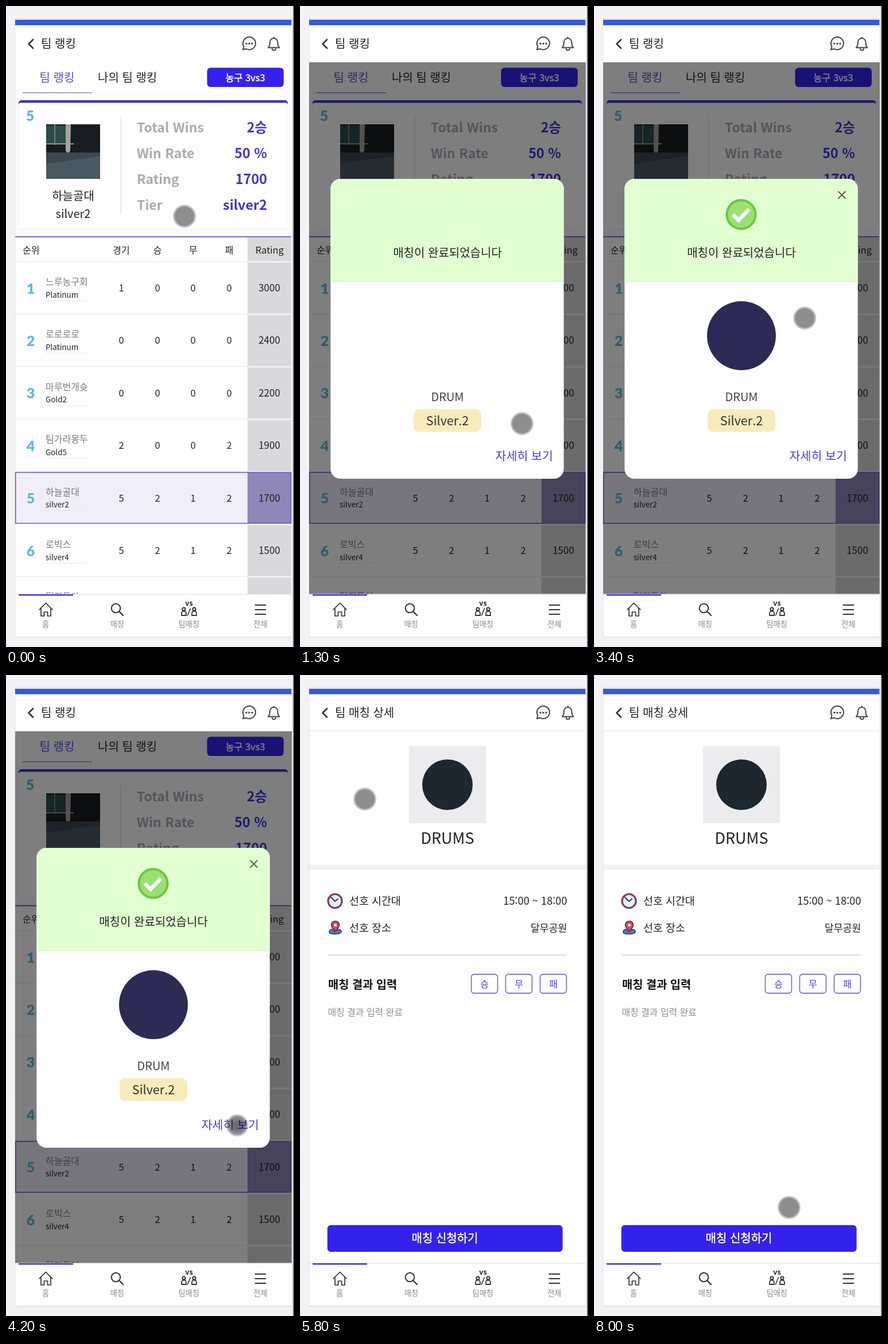
Recreate the animation shown at these times as an HTML page. Size 502x1116 px, loop 8100 ms.

```html
<!DOCTYPE html>
<html lang="ko">
<head>
<meta charset="utf-8">
<title>팀 랭킹</title>
<style>
  html, body { margin: 0; width: 100%; height: 100%; overflow: hidden; background: #f3f2f5; }
  svg { display: block; width: 502px; height: 1116px; }
  text { font-family: "Noto Sans CJK KR", "Noto Sans KR", "Noto Sans", sans-serif; white-space: pre; }
  .rank { font-family: Lato, sans-serif; }
  .medium { stroke: #fff; stroke-width: .5; }
  .icon { fill: none; stroke: #333; stroke-width: 2; stroke-linecap: round; stroke-linejoin: round; }
</style>
</head>
<body>
<svg id="stage" viewBox="0 0 502 1116"></svg>
<script>
const LOOP = 8100, STEP = 100;
const VIOLET = '#4434d2', BUTTON = '#3422ec', GREY = '#d9d8da';

const rect = (x, y, w, h, fill, more = '') =>
  `<rect x="${x}" y="${y}" width="${w}" height="${h}" fill="${fill}" ${more}/>`;
const circle = (x, y, r, fill, more = '') =>
  `<circle cx="${x}" cy="${y}" r="${r}" fill="${fill}" ${more}/>`;
const path = (d, more = 'class="icon"') => `<path d="${d}" ${more}/>`;
const text = (x, y, s, size, fill = '#222', anchor = 'start', weight = 400, more = '') =>
  `<text x="${x}" y="${y}" font-size="${size}" fill="${fill}" text-anchor="${anchor}" font-weight="${weight}" ${more}>${s}</text>`;
const mid = (x, y, s, size, fill, weight, more) => text(x, y, s, size, fill, 'middle', weight, more);
const end = (x, y, s, size, fill, weight) => text(x, y, s, size, fill, 'end', weight);
const rank = (x, y, n) => mid(x, y, n, 25, '#62b9d9', 900, 'class="rank"');
const label = (x, y, s, size) => mid(x, y, s, size, '#fff', 400, 'class="medium"');
const group = (id, ...parts) => `<g id="${id}">${parts.join('')}</g>`;
const glow = (id, ...stops) => `<radialGradient id="${id}">` +
  stops.map(([at, alpha]) => `<stop offset="${at}" stop-opacity="${alpha}"/>`).join('') + '</radialGradient>';

const columns = [201, 264, 326, 389];
const teams = [
  ['느루농구회', 'Platinum', '1000', 3000],
  ['로로로로', 'Platinum', '0000', 2400],
  ['마루번개슛', 'Gold2', '0000', 2200],
  ['팀가라몽두', 'Gold5', '2002', 1900],
  ['하늘골대', 'silver2', '5212', 1700],
  ['로빅스', 'silver4', '5212', 1500],
  ['팀진두아', '', '', ''],
];

function teamRow([name, tier, scores, rating], i) {
  const y = 491 + i * 91.4, top = y - 45.5, mine = i === 4;
  return [
    mine ? rect(16.7, top + 1, 480, 88.5, '#f0eefb') : '',
    rect(421, top + 1, 76, 89, mine ? '#8f87b7' : GREY),
    mine ? rect(16.7, top + 1, 480, 88.5, 'none', 'stroke="#6458c6" stroke-width="1.5"')
         : rect(16, top + 90, 482, 1.6, '#efeff1'),
    rank(43, y + 9.5, i + 1),
    text(69, y - 5, name, 16, '#7b7b7f'),
    text(69, y + 16.5, tier, 13.4),
    rect(69, y + 21.5, 73, 1, '#e9e8ed'),
    ...[...scores].map((n, k) => mid(columns[k], y + 6, n, 16.5)),
    mid(459, y + 6, rating, 17),
  ].join('');
}

const photo = [
  rect(70, 206, 94, 95, '#4b5862'),
  rect(70, 206, 94, 49, '#191d21'),
  rect(70, 208, 34, 33, '#2c4b4a'),
  rect(70, 239, 48, 2, '#8c9a98'),
  rect(84, 206, 2, 36, '#71817e'),
  path('M104 206h9l-1 46-4 6-4-6z', 'fill="#a6a4a0"'),
  path('M70 255h94v6l-94 14z', 'fill="#3b4751"'),
].join('');

const stats = [['Total Wins', '2승'], ['Win Rate', '50 %'], ['Rating', '1700'], ['Tier', 'silver2']];

const ranking = group('ranking',
  rect(16, 98, 482, 926, '#fbfafd'),
  rect(16, 98, 482, 54, '#fefdff'),
  mid(89, 132, '팀 랭킹', 20, '#5a49dc'),
  text(160, 132, '나의 팀 랭킹', 20),
  rect(29, 150, 121, 2, '#a9a0e4'),
  rect(350.5, 107.5, 133.5, 33.5, BUTTON, 'rx="6"'),
  label(417, 131, '농구 3vs3', 16.4),
  rect(21, 164, 471, 225, '#f1f0f4', 'rx="6"'),
  rect(22, 164, 469, 30, '#3f30cc', 'rx="5"'),
  rect(22, 168.5, 469, 219, '#fefdff', 'rx="4"'),
  rank(42, 200, 5),
  photo,
  mid(117, 338, '하늘골대', 20),
  mid(117, 369, 'silver2', 20),
  rect(199.5, 193, 1.3, 170, '#dedde2'),
  ...stats.map(([name, value], i) =>
    text(228, 219.5 + i * 45, name, 23, '#ababb0', 'start', 700) +
    end(455, 219.5 + i * 45, value, 23.4, VIOLET, 700)),
  rect(16, 402, 482, 622, '#fefdff'),
  rect(421, 403, 76, 41, GREY),
  rect(16, 444, 482, 1.6, '#efeff1'),
  rect(16, 400.8, 481, 1.9, '#6a5dc9'),
  text(29, 430.5, '순위', 16),
  ...['경기', '승', '무', '패'].map((s, k) => mid(columns[k], 430.5, s, 16)),
  mid(459.5, 430.5, 'Rating', 16.4),
  ...teams.map(teamRow));

const modal = group('modal',
  rect(16, 98, 482, 926, '#000', 'opacity=".5"'),
  rect(53.3, 301, 406.5, 522, '#fefdff', 'rx="17"'),
  path('M53.3 480V318a17 17 0 0 1 17-17H442.8a17 17 0 0 1 17 17V480z', 'fill="#e2ffd2"'),
  rect(53.3, 479.5, 406.5, 1, '#dfe9da'),
  mid(257, 436.5, '매칭이 완료되었습니다', 20),
  mid(257, 688, 'DRUM', 20, '#444'),
  rect(198, 702, 118, 39.5, '#f8ebbb', 'rx="10"'),
  mid(257, 729.5, 'Silver.2', 21.6, '#333'),
  end(441, 791, '자세히 보기', 20.6, '#4c3be4'),
  group('images',
    path('M426 323l12 12m0-12l-12 12', 'class="icon" style="stroke-width:1.6"'),
    circle(256.5, 363, 25, '#9cdf72', 'stroke="#68c93f" stroke-width="4"'),
    path('M242 363l10 10 18-19', 'fill="none" stroke="#fff" stroke-width="6.5"'),
    circle(257, 574, 60, '#2d2b55')));

const clock = circle(61, 393.5, 12, '#e9eff8', 'stroke="#33335a" stroke-width="3"') +
  circle(61, 393.5, 11.5, 'none', 'stroke="#b5465a" stroke-width="1.6"') +
  path('M54 387l7 7 5-4', 'class="icon" style="stroke:#33335a"');
const pin = path('M51 447q0-4 5-4h11q5 0 5 4t-11 4-10-4z', 'fill="#5478b4" stroke="#33335a" stroke-width="1.5"') +
  path('M61.5 447q-7-8-7-12a7 6.5 0 0 1 14 0q0 4-7 12z', 'fill="#d8475c" stroke="#4a2c4c" stroke-width="1.5"') +
  circle(61.5, 435.5, 2.5, '#fff');

const detail = group('detail',
  rect(16, 98, 482, 926, '#fefdff'),
  rect(16, 96.5, 482, 1.8, '#efeef1'),
  rect(190, 124, 134, 134, '#ececee'),
  circle(257, 191, 44, '#1c272f'),
  mid(257, 294, 'DRUMS', 27),
  rect(16, 330, 482, 9, '#f2f1f4'),
  clock, pin,
  text(86, 400, '선호 시간대', 18.4),
  end(465.5, 400, '15:00 ~ 18:00', 18.2),
  text(86, 447, '선호 장소', 18.4),
  end(465.5, 447, '달무공원', 17.3),
  rect(48, 486.5, 417, 2, '#dad9df'),
  text(49, 546, '매칭 결과 입력', 19.8, '#111', 'start', 700),
  text(48.5, 593, '매칭 결과 입력 완료', 15.9, '#8f8f94'),
  ...['승', '무', '패'].map((s, i) =>
    rect(298.5 + i * 60, 521, 46, 33, '#fefdff', 'rx="5" stroke="#5b4ed6" stroke-width="1.3"') +
    mid(321.5 + i * 60, 543.5, s, 16, '#4f40dc')),
  rect(47.7, 957.7, 410, 46.5, BUTTON, 'rx="6"'),
  label(252.5, 988, '매칭 신청하기', 20));

const header = group('header',
  rect(16, 24, 481.5, 9.5, '#345ad6'),
  path('M47 58.5l-7.5 7.5 7.5 7.5', 'class="icon" style="stroke-width:2.6"'),
  text(61, 73, '', 20, '#222', 'start', 400, 'id="title"'),
  path('M413 76l1.5-5.5a11 11 0 1 1 4 4z', 'class="icon" style="stroke:#444"'),
  ...[419, 424, 429].map(x => circle(x, 65.5, 1.6, '#333')),
  path('M457 72.5q3-3 3-9a6.8 7.5 0 0 1 13.6 0q0 6 3 9zM464 74.5a3 2.5 0 0 0 6 0M466.8 54.5v1', 'class="icon" style="stroke:#444"'));

const person = x => circle(x, 1050, 2.6, 'none', 'stroke="#222" stroke-width="1.8"') +
  path(`M${x - 4} 1061v-3.5a4 4 0 0 1 8 0v3.5z`, 'class="icon" style="stroke-width:1.8"');

const nav = group('nav',
  rect(16, 1024, 482, 74, '#fefdff'),
  rect(16, 1023.5, 482, 1.5, '#e8e7ec'),
  rect(22, 1024, 95, 2.8, '#5546d8'),
  path('M58 1051l11.5-11.5 11.5 11.5M61 1049v13h5.5v-7h6v7h5.5v-13', 'class="icon" style="stroke-width:1.7"'),
  circle(191.5, 1048.5, 7.8, 'none', 'class="icon"'),
  path('M197.5 1054.5l6.5 6.5', 'class="icon" style="stroke-width:2.4"'),
  mid(319, 1044, 'vs', 12.5, '#222', 700),
  person(310), person(328),
  path('M316.5 1061l5-12', 'class="icon" style="stroke-width:1.6"'),
  path('M434.5 1043h18M434.5 1051h18M434.5 1059h18'),
  ...['홈', '매칭', '팀매칭', '전체'].map((s, i) => mid(69 + i * 124.8, 1081, s, 13.2, '#8a8a8e')));

document.getElementById('stage').innerHTML = [
  glow('hover', [.8, .44], [.87, .26], [.95, .2], [1, 0]),
  glow('press', [.35, .56], [.75, .42], [1, 0]),
  rect(0, 0, 502, 1116, '#f3f2f5'),
  rect(15, 21.5, 484, 1078, '#e1e0e4'),
  rect(16, 23.5, 482, 1074, '#fefdff'),
  rect(500.5, 0, 1.5, 1116, '#4a4d4b'),
  ranking, modal, detail, header, nav,
  circle(0, 0, 20.5, 'url(#hover)', 'id="cursor"'),
].join('');

// Pointer path: time, x, y
const pointer = [
  [0, 311, 366], [700, 385, 560], [1300, 387, 727], [1800, 392, 690], [2200, 392, 690],
  [2500, 357, 449], [2900, 350, 425], [3100, 350, 425], [4000, 402, 780], [4200, 403, 784],
  [4900, 403, 786], [5100, 374, 770], [5700, 118, 228], [5800, 113, 216], [6700, 214, 992],
  [6900, 210, 1030], [7200, 262, 952], [8000, 340, 927], [8100, 340, 927],
];

function pointerAt(t) {
  const i = pointer.findIndex(p => p[0] > t);
  const [t0, x0, y0] = pointer[i - 1], [t1, x1, y1] = pointer[i];
  const k = (t - t0) / (t1 - t0);
  return [x0 + (x1 - x0) * k, y0 + (y1 - y0) * k];
}

const el = id => document.getElementById(id);
const show = (id, on) => { el(id).style.display = on ? '' : 'none'; };

function draw() {
  const t = Math.floor(performance.now() % LOOP / STEP) * STEP;
  const blank = t >= 5000 && t < 5300, details = t >= 5300;
  const pressed = t >= 4200 && t < 4500;
  show('ranking', t < 5000);
  show('modal', t >= 1200 && t < 5000);
  show('images', t >= 1400);
  show('detail', details);
  show('header', !blank);
  show('nav', !blank);
  show('cursor', t < 7000 || t >= 7200);
  el('title').textContent = details ? '팀 매칭 상세' : '팀 랭킹';
  el('cursor').setAttribute('transform', `translate(${pointerAt(t)})`);
  el('cursor').setAttribute('fill', `url(#${pressed ? 'press' : 'hover'})`);
  requestAnimationFrame(draw);
}
draw();
</script>
</body>
</html>
```
